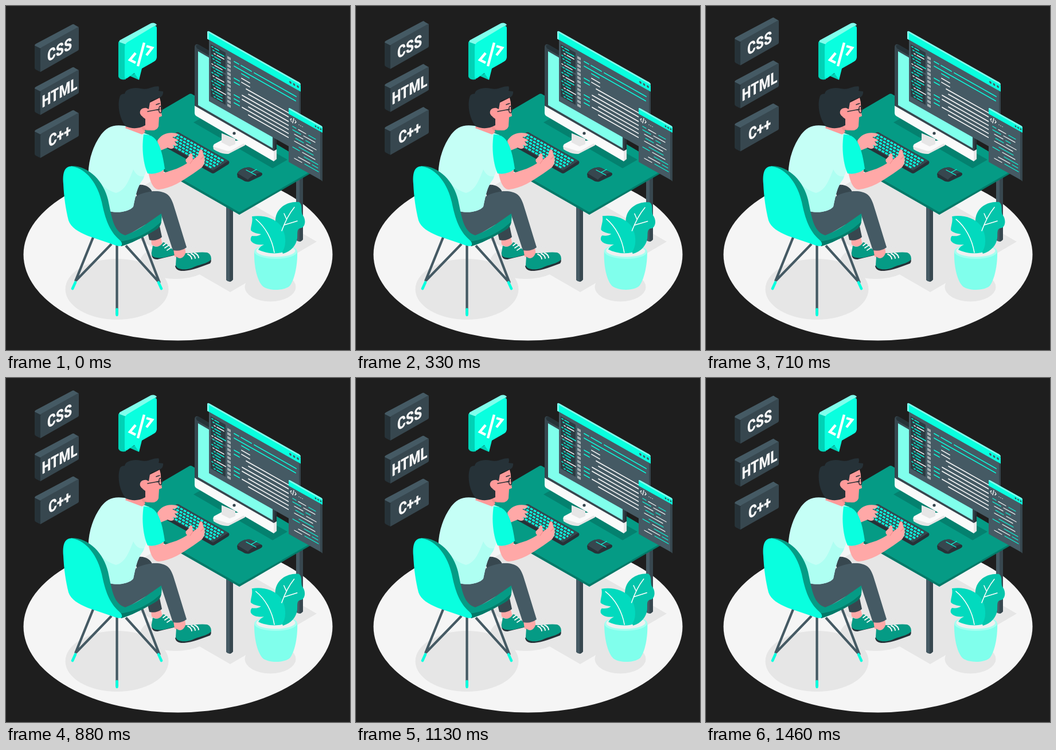
An HTML page that plays this animation: 600x600 px, repeating every 1.5 s.

```html
<!DOCTYPE html>
<html lang="en">
<head>
<meta charset="utf-8">
<title>Developer at work</title>
<style>
  html, body { margin: 0; width: 100%; height: 100%; overflow: hidden; background: #1e1e1e; }
  svg { display: block; width: 100vw; height: 100vh; }
  text { font: 800 29px Roboto, sans-serif; fill: #f5f5f5; text-anchor: middle; }
  .line { fill: none; stroke-linecap: round; stroke-linejoin: round; }
  .cyan { fill: #09ffdf; } .teal { fill: #059b85; } .deep { fill: #037a69; }
  .mint { fill: #80ffec; } .skin { fill: #ffa8a7; } .rose { fill: #f28f8f; } .face { fill: #ff9a9a; }
  .ink { fill: #263238; } .slate { fill: #37474f; } .steel { fill: #455a64; }
  .shade { fill: #e6e6e6; } .white { fill: #fafafa; }
</style>
</head>
<body>
<svg viewBox="0 0 600 600">
  <rect width="600" height="600" fill="#1e1e1e"/>

  <g id="floor">
    <ellipse cx="300" cy="433.5" rx="269.5" ry="150" fill="#f5f5f5"/>
    <g class="shade">
      <path d="M306 275L542 411 391 499 155 363Z"/>
      <ellipse cx="193.5" cy="494" rx="90" ry="53"/>
      <ellipse cx="296" cy="446" rx="62" ry="30"/>
      <ellipse cx="461" cy="490" rx="44.5" ry="25.5"/>
    </g>
  </g>

  <g id="desk">
    <path class="steel" d="M506 295H518V407Q512 414 506 408Z"/>
    <path class="slate" d="M512 295H518V407Q515 411 512 411Z"/>
    <path class="steel" d="M384 340H396V477Q390 484 384 478Z"/>
    <path class="slate" d="M390 340H396V477Q393 481 390 481Z"/>
    <path class="deep" d="M186 232L407 359 540 282V287L407 364 186 238Z"/>
    <path class="teal" d="M319 154Q322 152 325 154L539 281Q541 283 538 285L410 358Q407 360 404 358L186 232Z"/>
    <path fill="#04816f" d="M327 203L352 189 491 268 465 283Z"/>
  </g>

  <g id="monitor">
    <path class="shade" d="M361 244L362 250Q376 259 388 258L417 243V236Z"/>
    <path class="white" d="M363 241L376 234V222L398 231 400 235 415 234Q419 237 414 240L393 252Q388 254 383 252L364 246Q360 244 363 241Z"/>
    <path class="shade" d="M376 222L400 232V241L390 245 376 238Z"/>
    <path class="slate" d="M329 72Q329 66 335 67L468 144Q472 147 472 152V254H467L329 176Z"/>
    <path class="ink" d="M335 67L468 144Q472 147 472 152V254L468 252V152L333 74 331 69Z"/>
    <path class="mint" d="M335 79L465 154V248L335 173Z"/>
    <path class="white" d="M329 174L467 253V271L332 192Q329 190 329 187Z"/>
    <path class="shade" d="M467 253L472 250V267L467 271Z"/>
    <circle class="slate" cx="398" cy="222" r="2.6"/>
  </g>

  <g id="editor" transform="matrix(1 .565 0 1 354 57)">
    <path class="steel" d="M0 0H159V109H0Z"/>
    <path class="slate" d="M157 0H160V109H157Z"/>
    <path class="ink" d="M3 8H29V44H3ZM3 47H29V99H3Z" opacity=".75"/>
    <path class="cyan" d="M-3 -10Q-3 -12 0 -11H157Q160 -11 160 -8V2H-3Z"/>
    <path class="mint" d="M-3 -10Q-2 -13 1 -13H157Q160 -13 160 -10H0V2H-3Z"/>
    <g class="steel"><circle cx="142" cy="-4" r="2"/><circle cx="148.5" cy="-4" r="2"/><circle cx="155" cy="-4" r="2"/></g>
    <g id="sidebar"></g>
    <g class="line" stroke-width="1.8">
      <path stroke="#09ffdf" d="M44 15h8M56 15h18M79 15h73M44 23h34M44 44h9M44 51h9M57 29h13M44 73h9M44 80h9M44 87h9M75 23h76"/>
      <path stroke="#f5f5f5" d="M57 37h14M57 44h14M65 51h83M69 58h73M58 66h84M58 73h82M69 80h71M58 87h82M69 94h71"/>
    </g>
  </g>

  <g id="terminal" transform="matrix(1 .56 0 1 493 178)">
    <path class="steel" d="M0 5H58V94H0Z"/>
    <path class="slate" d="M55 8H59V95L55 93Z"/>
    <path class="cyan" d="M0 1Q0 -1 3 -1H57Q59 -1 59 1V10H0Z"/>
    <path class="mint" d="M0 1Q0 -1 3 -1H57Q59 -1 59 2H0Z"/>
    <g class="slate"><circle cx="47" cy="5.5" r="1.4"/><circle cx="51.5" cy="5.5" r="1.4"/><circle cx="56" cy="5.5" r="1.4"/></g>
    <g class="line" stroke-width="1.3">
      <path stroke="#f5f5f5" d="M5 16l-2 2 2 3M9 13l-2 9M11 15l2 2-2 3M18 19h.1M21 19h.1M24 19h.1M17 28h13M26 34h20M10 40h15M31 46h17M10 52h32M24 64h22M17 76h20M10 82h13"/>
      <path stroke="#09ffdf" d="M7 28h6M35 28h12M7 34h14M30 40h8M12 46h14M18 58h25M7 64h12M27 70h24M41 76h10M28 82h24"/>
    </g>
  </g>

  <g id="desktop">
    <path class="ink" d="M272 239L297 221Q299 219 302 221L388 270Q391 272 388 276L364 291Q361 293 358 291L272 243Z"/>
    <path class="slate" d="M272 237L297 221Q299 219 302 221L388 270 361 287Z"/>
    <g id="keys" class="line" stroke="#09ffdf" stroke-width="3.3" stroke-dasharray="5 1.8" style="stroke-linecap:butt"></g>
    <path class="ink" d="M403 293C406 285 418 280 427 282L446 291Q449 294 444 297L425 306Q419 308 412 303L404 299Z"/>
    <path class="slate" d="M404 292C408 284 419 280 427 282L445 291C436 291 428 296 422 303Z"/>
    <path class="line" d="M419 286L436 295M428 290L437 285" stroke="#09ffdf" stroke-width="1.3"/>
  </g>

  <g id="person">
    <path class="skin" d="M252 400L269 399 273 417Q264 423 254 416Z"/>
    <path class="ink" d="M254 433Q254 442 264 442L297 434V428Z"/>
    <path class="teal" d="M256 418C263 422 270 419 274 412C283 414 286 424 297 428V434C285 435 275 441 263 439Q252 438 254 429Z"/>
    <path class="line" d="M274 418l5-4M277 422l6-4M281 426l6-4" stroke="#fafafa" stroke-width="2"/>
    <path class="slate" d="M222 315C236 307 254 314 256 328L272 403Q262 411 250 408L236 350Z"/>

    <path class="skin" d="M264 235C270 225 280 219 297 222Q302 224 297 227L290 229 299 233Q301 237 294 236L298 242Q297 246 291 242L293 247Q289 251 282 247L267 253Z"/>
    <path class="skin" d="M292 424L312 420 314 436Q304 444 294 437Z"/>
    <path class="ink" d="M295 453Q296 463 311 462C326 461 342 454 356 449Q359 445 357 440Z"/>
    <path class="teal" d="M297 437C304 443 310 439 313 431C325 432 337 428 351 430Q358 433 358 441C355 449 335 451 324 457C312 461 298 460 296 452Z"/>
    <path class="line" d="M317 433q6 2 7 8M323 432q6 2 7 8M329 431q6 2 7 8" stroke="#fafafa" stroke-width="2"/>
    <path class="steel" d="M181 358L232 329C250 322 270 320 282 329C290 336 292 347 296 359L315 421Q304 429 291 426L271 365 205 404 178 382Z"/>

    <path fill="#c5fff6" d="M207 209C187 206 176 211 166 224C150 246 142 275 144 300C158 310 175 334 181 358C196 362 216 358 222 350C226 332 228 316 239 302L248 280 250 225Z"/>
    <path fill="#aefff2" d="M146 298C160 303 174 322 192 326C209 322 216 300 222 285C228 296 233 298 241 297L239 302C228 316 226 332 222 350C216 358 196 362 181 358C175 334 158 310 144 300Z"/>
    <path class="face" d="M211 204L243 205 242 217Q243 222 237 224L208 213Z"/>
    <path class="rose" d="M240 206L255 216Q248 218 242 216L243 221Q239 218 236 211Z"/>
    <path class="face" d="M240 174L268 160Q271 169 270 179L272 192 267 194 266 210Q263 218 253 217Q242 215 237 208Z"/>
    <path class="ink" d="M209 210C200 199 195 181 197 165L198 160Q199 153 207 153C208 145 223 141 235 144C248 147 253 140 266 140Q268 143 266 148L274 149Q275 158 266 160C258 164 253 164 251 168L249 180 245 178C238 176 233 184 235 191L243 197V208C231 215 219 214 209 210Z"/>
    <path class="face" d="M246 180C239 175 232 181 234 188Q237 195 245 194Z"/>
    <path class="line" d="M247 184L268 180M262 172l6-2M268 175Q273 174 272 181Q271 188 268 186Q265 181 268 175Z" stroke="#263238" stroke-width="1.5"/>

    <path class="skin" d="M248 288C251 306 257 321 267 320C288 318 308 305 327 292L341 282C348 275 347 264 345 261L343 253Q340 247 337 253L335 261 326 268 325 258Q321 255 319 262L314 267Q312 271 316 274C305 282 292 286 275 291V280Z"/>
    <path class="line" d="M326 268l-5 7M345 262l-5 5" stroke="#f28f8f" stroke-width="1.2"/>
    <path class="cyan" d="M240 224C260 224 270 236 277 284Q264 295 247 292C240 277 236 250 240 224Z"/>
  </g>

  <g id="chair">
    <path class="line" d="M153 401L121 480M184 415L122 479M193.5 416V538M209 418L267 482M237 402L268 483" stroke="#455a64" stroke-width="4.3" style="stroke-linecap:butt"/>
    <path class="line" d="M121 482L116 493M193.5 529V539M266 482L271 493" stroke="#09ffdf" stroke-width="4.6"/>
    <path class="teal" d="M113 279C145 278 171 307 178 338C185 370 187 393 208 400C235 390 255 372 271 362Q274 380 263 389C245 400 219 414 201 419L160 380Z"/>
    <path class="deep" d="M198 411C227 408 253 393 271 376Q270 385 263 389C245 400 219 414 201 419Z"/>
    <path class="cyan" d="M100 310C98 288 104 278 116 280C141 284 160 311 167 342C173 371 180 392 197 407Q205 414 201 418Q197 420 187 416L143 401C126 394 113 386 109 374C104 354 101 333 100 310Z"/>
  </g>

  <g id="bubble">
    <path fill="#00d2b6" d="M196 65Q196 60 201 61L209 65V128Q198 130 196 123Z"/>
    <path class="mint" d="M198 60L253 30Q260 28 263 33L209 67 198 63Z"/>
    <path fill="#00d2b6" d="M216 122L232 129 229 115Z"/>
    <path class="cyan" d="M207 72Q207 66 212 63L257 36Q263 33 263 39V89Q263 94 258 97L237 109 232 129 224 117 211 126Q207 128 207 123Z"/>
    <path class="line" d="M226 82L216 94 226 99M241 64L230 105M245 70L255 73 245 86" stroke="#fff" stroke-width="4.4" style="stroke-linecap:butt;stroke-linejoin:miter"/>
  </g>

  <g id="signs"></g>

  <g id="plant">
    <path class="mint" d="M433 427H508C509 454 502 481 494 489C483 497 459 497 448 489C438 480 432 453 433 427Z"/>
    <ellipse cx="470.5" cy="428" rx="37.5" ry="13" fill="#a6fff1"/>
    <ellipse cx="470.5" cy="427" rx="34" ry="10.5" fill="#f0f0f0"/>
    <path fill="#04c5ab" d="M483 432C475 415 467 393 470 372C472 351 492 340 511 342C518 346 514 357 517 364C523 371 523 383 516 387C506 388 509 395 508 405C506 418 497 428 483 432Z"/>
    <path fill="#02dabe" d="M429 367C447 364 468 369 479 383C489 397 490 419 481 430C468 433 452 431 440 425C442 421 446 418 450 416C441 417 431 416 427 409Q426 404 429 401C436 402 441 401 445 398C438 397 430 395 427 391C427 383 431 376 429 367Z"/>
    <path class="line" d="M436 372C452 385 464 406 468 430M503 351C494 362 486 378 481 392M489 371L485 362M485 382L508 375" stroke="#fff" stroke-width="1.5"/>
  </g>
</svg>
<script>
const $ = id => document.getElementById(id);

$('signs').innerHTML = ['CSS', 'HTML', 'C++'].map((label, i) => `
  <g transform="translate(0 ${i * 75})">
    <path class="ink" d="M50 69L60 74V115L52 111Q50 110 50 108Z"/>
    <path class="steel" d="M50 69Q50 67 52 66L116 32Q118 31 120 33L127 37 60 74Z"/>
    <path class="slate" d="M60 76Q60 73 62 72L125 37Q127 36 127 39V75Q127 77 125 78L60 115Z"/>
    <text transform="matrix(.78 -.43 0 1 93.5 86)">${label}</text>
  </g>`).join('');

// Sidebar entries and line numbers share the editor's slant.
let rows = '';
for (let i = 0; i < 18; i++) {
  const y = 11 + i * 5, indent = 5 + i % 3 * 2, width = 7 + i * 7 % 9;
  rows += `<path class="line" stroke-width="1.7" stroke="${i % 4 == 2 ? '#f5f5f5' : '#09ffdf'}" d="M${indent} ${y}h2M${indent + 5} ${y}h${width}"/>`;
  if (i < 13) rows += `<rect x="32" y="${12 + i * 6.9}" width="6" height="4.6" fill="#a6b0b4"/>`;
}
$('sidebar').innerHTML = rows;

for (let i = 0; i < 5; i++) {
  const x = 298 - i * 5, y = 224 + i * 3.1;
  $('keys').innerHTML += `<path stroke-dashoffset="${i * 2}" d="M${x} ${y}l82 46.5"/>`;
}

const LOOP = 1500;
const triangle = p => 1 - Math.abs(1 - 2 * p);

function draw(now) {
  const p = now % LOOP / LOOP;
  const lift = 12 * triangle(p);
  const sway = 2 * triangle((p + .25) % 1) - 1;
  $('signs').setAttribute('transform', `translate(0 ${-lift})`);
  $('plant').setAttribute('transform', `rotate(${sway} 474 418)`);
  requestAnimationFrame(draw);
}
draw(performance.now());
</script>
</body>
</html>
```
